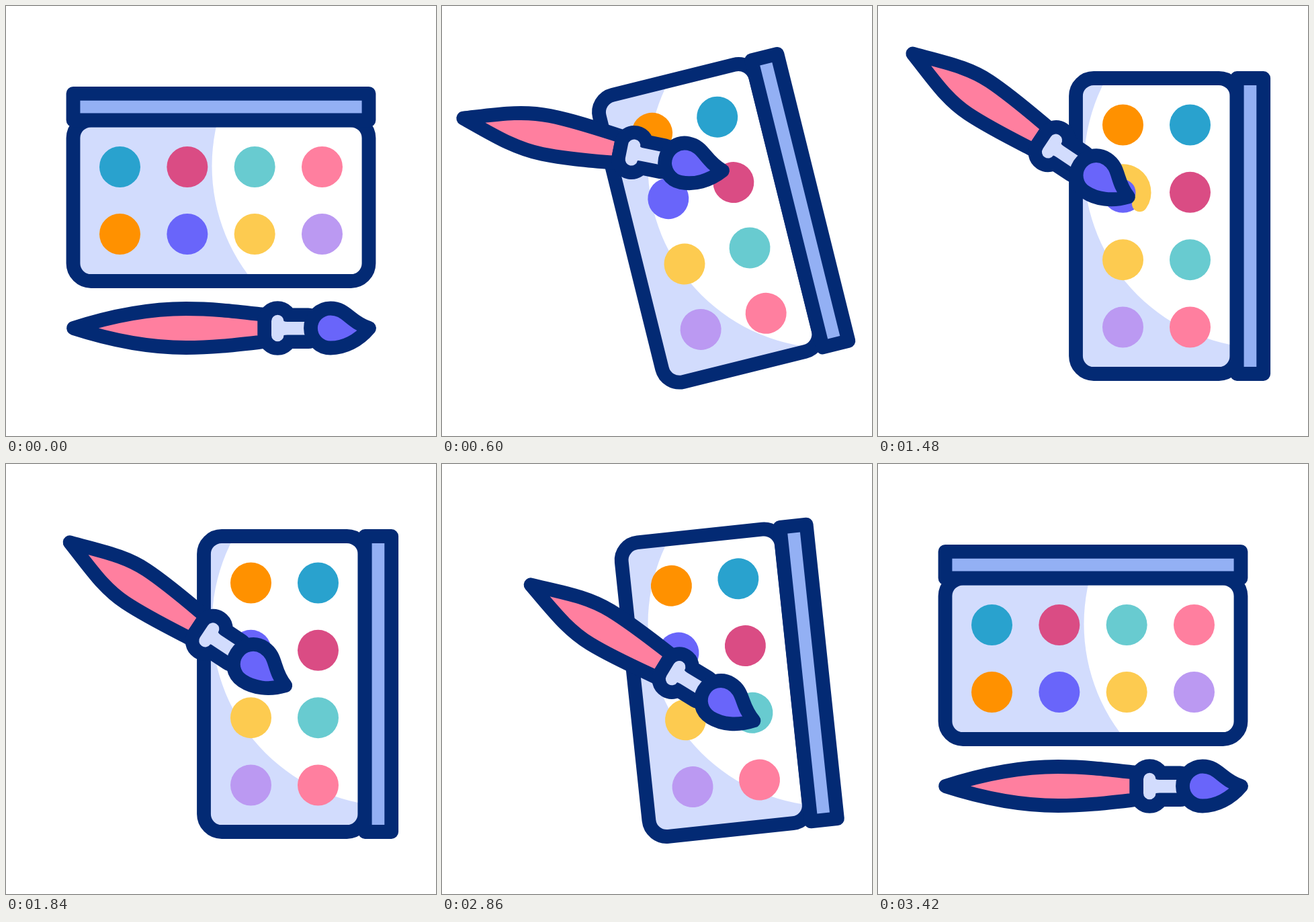
Write an HTML page with a canvas that moves like this. It is 640x640 px and loops after 3.6 s.

```html
<!DOCTYPE html>
<html lang="en">
<head>
<meta charset="utf-8">
<title>Paint box</title>
<style>
  html, body { margin: 0; width: 100%; height: 100%; overflow: hidden; background: #fff; }
  canvas { display: block; width: 640px; height: 640px; }
</style>
</head>
<body>
<canvas id="stage" width="640" height="640"></canvas>
<script>
const ctx = document.getElementById('stage').getContext('2d');
const LOOP = 3600;
const NAVY = '#032a74', PALE = '#d2dcfd', LID = '#93b0f4';
const PINK = '#ff7f9f', VIOLET = '#6965fa', YELLOW = '#fdcb50';
const CUPS = [
  ['#29a2ce', '#da4c84', '#68cbd0', PINK],
  ['#ff9100', VIOLET, YELLOW, '#bb99f2']
];
const LINE = 20.8;

// Each tap pushes the box down and draws a ring around one cup.
const TAPS = [
  { at: 1032, col: 1, row: 1 },
  { at: 2080, col: 2, row: 0 }
];

const BRUSH = {
  rest:   { x: 540.5, y: 479.5, deg: 0 },
  raised: { x: 395, y: 202, deg: 13.5 },
  first:  { x: 372.5, y: 284, deg: 33.6 },
  second: { x: 458.5, y: 375, deg: 33.6 }
};

const mix = (a, b, k) => a + (b - a) * k;
const ease = (t, from, to) => {
  const k = Math.min(1, Math.max(0, (t - from) / (to - from)));
  return k * k * (3 - 2 * k);
};
const blend = (a, b, move, turn = move) => ({
  x: mix(a.x, b.x, move),
  y: mix(a.y, b.y, move),
  deg: mix(a.deg, b.deg, turn)
});
const cupX = col => -150.5 + col * 100.33;
const cupY = row => -30.5 + row * 100;

function turnProgress(t) {
  return ease(t, 0, 800) - ease(t, 2757, 3415);
}

function brushPose(t) {
  if (t < 800) return blend(BRUSH.rest, BRUSH.raised, ease(t, 0, 800));
  if (t < 1600) {
    const k = ease(t, 800, 1032);
    return blend(BRUSH.raised, BRUSH.first, k ** 2.5, k);
  }
  if (t < 2700) return blend(BRUSH.first, BRUSH.second, ease(t, 1600, 2080));
  return blend(BRUSH.second, BRUSH.rest, ease(t, 2757, 3415));
}

function paint(path, fill, width = LINE) {
  ctx.fillStyle = fill;
  ctx.fill(path);
  ctx.lineWidth = width;
  ctx.strokeStyle = NAVY;
  ctx.stroke(path);
}

function disc(x, y, r, fill) {
  ctx.fillStyle = fill;
  ctx.beginPath();
  ctx.arc(x, y, r, 0, 2 * Math.PI);
  ctx.fill();
}

const body = new Path2D();
body.roundRect(-220, -100, 440, 239.5, 26.5);
const lid = new Path2D();
lid.rect(-220, -139.7, 440, 39.5);

function drawRing(t, { at, col, row }) {
  const end = ease(t, at, at + 280);
  const start = ease(t, at + 280, at + 560);
  if (end <= 0 || start >= 1) return;
  const angle = k => Math.PI - k * 2 * Math.PI;
  ctx.beginPath();
  ctx.arc(cupX(col), cupY(row), 30.5, angle(start), angle(end), true);
  ctx.lineWidth = 23;
  ctx.strokeStyle = YELLOW;
  ctx.stroke();
}

function drawBox(t) {
  const p = turnProgress(t);
  const push = TAPS.reduce((sum, { at }) =>
    sum + 10.5 * (ease(t, at, at + 200) - ease(t, at + 200, at + 400)), 0);
  ctx.save();
  ctx.translate(mix(320, 434, p), mix(270, 327.5, p) + push);
  ctx.rotate(p * Math.PI / 2);

  // The white highlight stays still on the stage while the box turns.
  ctx.save();
  ctx.clip(body);
  ctx.fillStyle = PALE;
  ctx.fill(body);
  ctx.resetTransform();
  disc(578, 238, 271.5, '#fff');
  ctx.restore();

  paint(body, 'transparent');
  paint(lid, LID);
  CUPS.forEach((colors, row) =>
    colors.forEach((color, col) => disc(cupX(col), cupY(row), 30.5, color)));
  TAPS.forEach(tap => drawRing(t, tap));
  ctx.restore();
}

// Brush paths are in stage coordinates of the resting pose.
const bone = new Path2D(`M395 469 A9.25 9.25 0 0 1 413.5 469 Q415 470 419 470
  H450 V489.5 H419 Q415 489.5 413.5 490 A9.25 9.25 0 0 1 395 490 Z`);
const bristle = new Path2D(`M540.5 479.5 C524 499 503 509 483 509
  A29.5 29.5 0 0 1 483 450 C507 450 511 470 540.5 479.5 Z`);

function handlePath(cut) {
  const tail = 100.5 + cut, near = 150 + cut, mid = 210 + cut * 0.45, top = 268 + cut * 0.1;
  return new Path2D(`M${tail} 479.5 C${near} 463.5 ${mid} 450.5 ${top} 450.5
    C310 450.5 345 455 385 459.5 V499.5
    C345 504 310 508.5 ${top} 508.5 C${mid} 508.5 ${near} 495.5 ${tail} 479.5 Z`);
}

function drawBrush(t) {
  const { x, y, deg } = brushPose(t);
  ctx.save();
  ctx.translate(x, y);
  ctx.rotate(deg * Math.PI / 180);
  ctx.translate(-BRUSH.rest.x, -BRUSH.rest.y);
  paint(handlePath(55 * turnProgress(t)), PINK);
  paint(bone, PALE, 41);
  ctx.fillStyle = PALE;
  ctx.fill(bone);
  paint(bristle, VIOLET);
  ctx.restore();
}

function frame(now) {
  const t = now % LOOP;
  ctx.fillStyle = '#fff';
  ctx.fillRect(0, 0, 640, 640);
  ctx.lineJoin = ctx.lineCap = 'round';
  drawBox(t);
  drawBrush(t);
}

const began = performance.now();
function loop() {
  frame(performance.now() - began);
  requestAnimationFrame(loop);
}
loop();
</script>
</body>
</html>
```
